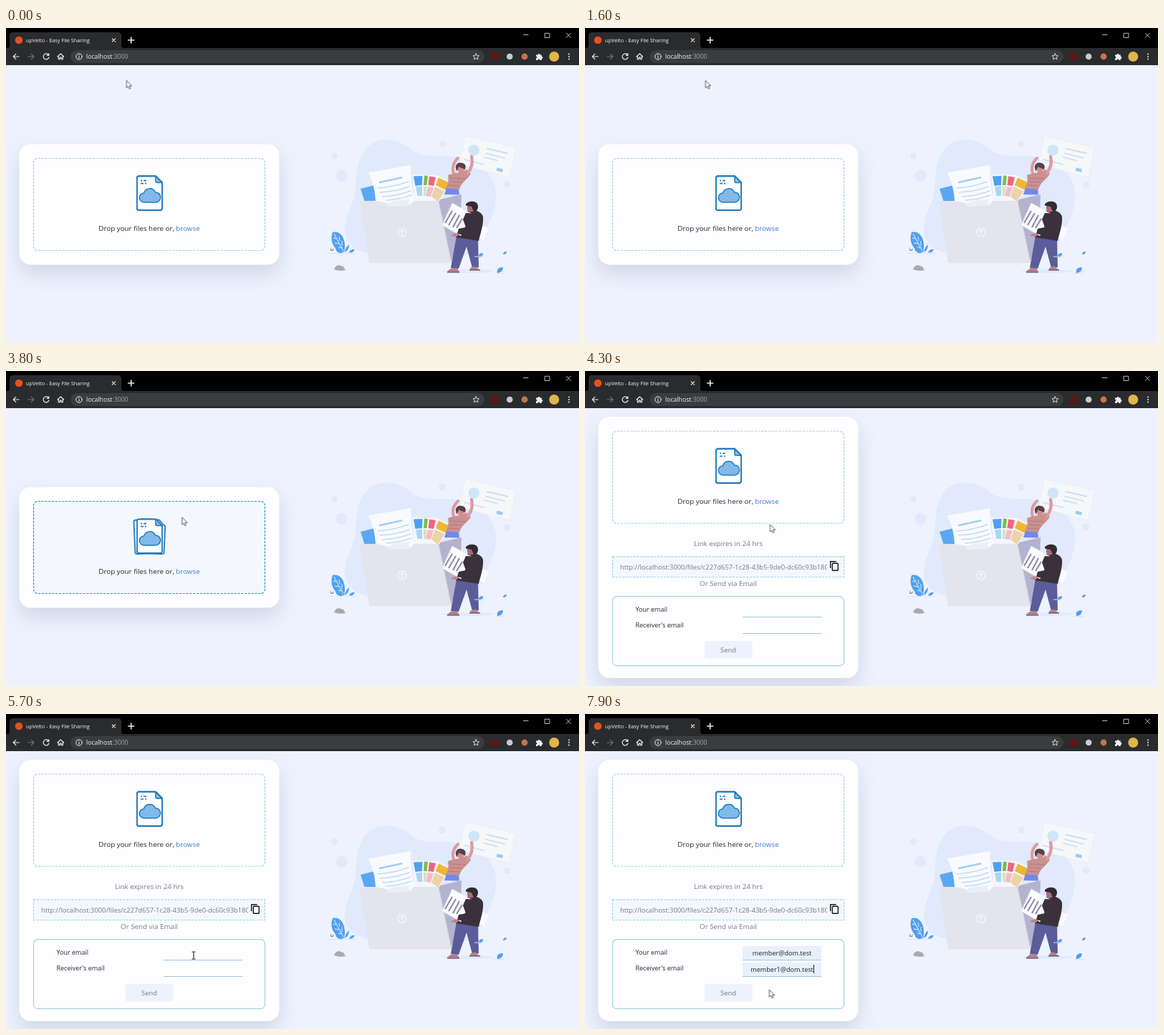
Recreate the animation shown at these times as an HTML page. Size 800x441 px, loop 8000 ms.

```html
<!DOCTYPE html>
<html lang="en">
<head>
<meta charset="utf-8">
<title>File sharing</title>
<style>
html, body { margin: 0; width: 100%; height: 100%; overflow: hidden; background: #edf2fe; }
body { position: relative; font-family: "Open Sans", "Noto Sans", sans-serif; }
svg { position: absolute; left: 0; top: 0; display: block; }
text { font-size: 9.8px; fill: #777a80; }
.mid { text-anchor: middle; }
.dark { fill: #25262b; }
.small { font-size: 9px; }
.ui { fill: none; stroke: #e9eaed; stroke-width: 1.2; stroke-linecap: round; stroke-linejoin: round; }
.white { fill: #fefdff; }
.shadow { filter: drop-shadow(0 13px 14px rgba(50, 60, 90, .15)); }
.line { fill: none; stroke: #a3d3df; stroke-width: 1.2; }
.dash { stroke-dasharray: 3.2 1.6; }
.page { fill: #fdfeff; stroke: #1e79bd; stroke-width: 1.8; stroke-linejoin: round; }

/* Everything shares one 8 s clock */
.idle, .open, #drop, #zone, #left, #right, #cursor, #arrow, #beam, .fill, .caret {
  animation: 8s step-end infinite;
}
.idle { animation-name: idle; }
.open { animation-name: open; }
#drop { animation-name: lift; }
#zone { fill: #f4f8fc; fill-opacity: 0; animation-name: hover; animation-timing-function: linear; }
.back { transform-box: fill-box; transform-origin: 50% 100%; }
#left { animation-name: fanLeft; animation-timing-function: ease-out; }
#right { animation-name: fanRight; animation-timing-function: ease-out; }
#cursor { animation-name: move; animation-timing-function: ease-in-out; }
#arrow { animation-name: arrow; }
#beam { animation-name: beam; }
#one .fill { animation-name: fillOne; }
#two .fill { animation-name: fillTwo; }
#one .caret { animation-name: caretOne; }
#two .caret { animation-name: caretTwo; }

@keyframes idle { 0% { opacity: 1 } 53.75%, 100% { opacity: 0 } }
@keyframes open { 0% { opacity: 0 } 53.75%, 100% { opacity: 1 } }
@keyframes lift { 0% { transform: none } 53.75%, 100% { transform: translateY(-98.3px) } }
@keyframes hover {
  0%, 44.5% { stroke: #a3d3df; fill-opacity: 0 }
  46%, 53.7% { stroke: #2795d3; fill-opacity: 1 }
  53.75%, 100% { stroke: #a3d3df; fill-opacity: 0 }
}
@keyframes fanLeft {
  0%, 44.5%, 53.75%, 100% { transform: none }
  47%, 53.7% { transform: translate(-2.5px, .5px) rotate(-2.6deg) }
}
@keyframes fanRight {
  0%, 44.5%, 53.75%, 100% { transform: none }
  47%, 53.7% { transform: translate(2.5px, .5px) rotate(2.6deg) }
}
@keyframes move {
  0%, 26.2% { transform: translate(168.3px, 73.5px) }
  26.25%, 37.5% { transform: translate(797px, 6px); animation-timing-function: ease-out }
  47.5%, 50% { transform: translate(245.8px, 204.8px) }
  54%, 59% { transform: translate(258.5px, 215px) }
  68%, 73% { transform: translate(262px, 338px) }
  80%, 83% { transform: translate(276px, 369px) }
  86%, 88% { transform: translate(270px, 360px) }
  93% { transform: translate(260px, 388px) }
  98%, 100% { transform: translate(257.3px, 386px) }
}
@keyframes arrow {
  0% { opacity: 1 } 26.25% { opacity: 0 } 37.5% { opacity: 1 }
  67.3% { opacity: 0 } 92%, 100% { opacity: 1 }
}
@keyframes beam { 0% { opacity: 0 } 67.3% { opacity: 1 } 92%, 100% { opacity: 0 } }
@keyframes fillOne { 0% { opacity: 0 } 80%, 100% { opacity: 1 } }
@keyframes fillTwo { 0% { opacity: 0 } 94%, 100% { opacity: 1 } }
@keyframes caretOne { 0% { opacity: 0 } 80% { opacity: 1 } 87%, 100% { opacity: 0 } }
@keyframes caretTwo { 0% { opacity: 0 } 94%, 100% { opacity: 1 } }

.field { position: absolute; left: 220px; width: 110px; height: 19px; border-bottom: 1px solid #9cc7e2; }
.fill { position: absolute; inset: 0; background: #e8f0fe; text-align: center; font-size: 9.1px; line-height: 20px; color: #202227; white-space: nowrap; }
.fill span { position: relative; }
.caret { position: absolute; right: -1.5px; top: 0; width: 1px; height: 12px; background: #222; }
</style>
</head>
<body>
<svg width="800" height="441" viewBox="0 0 800 441">
  <defs>
    <path id="sheet" d="M185.5 207.5H209L218 216.5V252.5a2.5 2.5 0 0 1-2.5 2.5h-30a2.5 2.5 0 0 1-2.5-2.5V210a2.5 2.5 0 0 1 2.5-2.5Z"/>
  </defs>
  <rect width="800" height="441" fill="#edf2fe"/>

  <!-- Browser bar -->
  <rect width="800" height="29" fill="#000"/>
  <path d="M0 28H2Q5 28 5 24V11Q5 6 10 6H156Q161 6 161 11V24Q161 28 164 28H800V52H0Z" fill="#2a2b2d"/>
  <rect x="90" y="31" width="578" height="18" rx="9" fill="#3b3c3f"/>
  <circle cx="18" cy="17" r="5.3" fill="#e4511f"/>
  <text x="28" y="19.6" style="font-size:7.3px;fill:#f4f5f6">upVelto - Easy File Sharing</text>
  <text x="112" y="43.3" style="font-size:8.7px;fill:#f1f2f3">localhost<tspan fill="#a5a9ae">:3000</tspan></text>
  <g class="ui">
    <path d="M148.3 14.8l4.4 4.4m0-4.4l-4.4 4.4"/>
    <path d="M174.7 13v8m-4-4h8" stroke-width="1.6"/>
    <path d="M722.5 9.5h6.5M752.5 7.3h6.4v6.2h-6.4zM782.3 7.2l6.2 6.2m0-6.2l-6.2 6.2" stroke-width=".8"/>
    <path d="M18.3 40h-8m3.5-3.6L10.2 40l3.6 3.6"/>
    <path d="M30.8 40h8m-3.5-3.6L38.9 40l-3.6 3.6" stroke="#717378"/>
    <path d="M59.4 37.6A4 4 0 1 0 60 41M59.8 35.8v2.6h-2.6"/>
    <path d="M72 40l4.3-4 4.3 4M73.3 39.5v4.2h2v-2.6h2v2.6h2v-4.2"/>
    <circle cx="102" cy="40" r="4.2" stroke-width="1"/>
    <path d="M102 39.8v2.2m0-4.1v.1"/>
    <path d="M656.3 35.8l1.3 2.8 3 .3-2.3 2 .7 3-2.7-1.6-2.7 1.6.7-3-2.3-2 3-.3z" stroke-width=".9"/>
  </g>
  <rect x="677.5" y="35" width="10" height="10" fill="#5f1613"/>
  <circle cx="703.2" cy="40" r="4.3" fill="#c9cacd"/>
  <circle cx="724" cy="40" r="4.4" fill="#c9734a"/>
  <path d="M740 37.5h2.5a1.6 1.6 0 1 1 3.2 0h2.1v2.3a1.6 1.6 0 1 1 0 3.2v2h-2.5a1.4 1.4 0 0 0-2.8 0h-2.5v-2.5a1.4 1.4 0 0 0 0-2.8z" fill="#eceef0"/>
  <circle cx="765.3" cy="40" r="7" fill="#e0b64a"/>
  <g fill="#eceef0"><circle cx="786" cy="36.4" r="1"/><circle cx="786" cy="40" r="1"/><circle cx="786" cy="43.6" r="1"/></g>

  <!-- Illustration: backdrop -->
  <g fill="#e0eafc">
    <path d="M500 172C514 151 545 152 566 170C584 184 601 176 626 180C656 184 681 202 684 228C687 258 668 282 660 306C650 330 560 322 510 316C480 312 470 294 474 273C477 255 486 246 488 225C490 205 488 190 500 172Z"/>
    <circle cx="458.5" cy="179" r="4.7"/><circle cx="468.5" cy="206.7" r="8.2"/>
    <circle cx="609" cy="162.5" r="4.8"/><circle cx="699.5" cy="219" r="4.8"/>
    <ellipse cx="645" cy="340.5" rx="36" ry="2.5"/>
  </g>
  <!-- Open folder and its papers -->
  <path d="M602 241L636 233L634 289L621 329Z" fill="#b4b2cf"/>
  <path d="M495 225L513 220.5L522 248L503 250Z" fill="#5ba7f3"/>
  <path d="M567 205L602 206L622 216L603 245L571 243Z" fill="#f5f6fb"/>
  <path d="M569 207.5L581.5 207L581 220L571.5 221Z" fill="#4f9ff1"/>
  <path d="M572 222.5L581 221.5L581 235L574.5 235Z" fill="#abd5f5"/>
  <path d="M584 206.5L589 207L587.5 220L583 220Z" fill="#7abd48"/>
  <path d="M583 222h4.5l-2 13h-2.5z" fill="#cde5bd"/>
  <path d="M591 207.5L600 209L597 221L589.5 220Z" fill="#f0657f"/>
  <path d="M589 222L597 223L593 236L586 235Z" fill="#f3bdca"/>
  <path d="M604 209.5L620 217L614 227L600 220Z" fill="#f0b637"/>
  <path d="M599 222L612.5 228.5L603 243L594 236Z" fill="#ecd3a8"/>
  <path d="M494 242H604L622 329H507Z" fill="#e3e4ed"/>
  <path d="M604 242L622 329" stroke="#cfcfdf" fill="none"/>
  <path d="M505.5 202.5L565.5 192C565 211 567 226 571 241C566 246 564 247 566 248L533 250C534 247 532 245 527 244L516 242C515 226 512 214 505.5 202.5Z" fill="#f9fafd"/>
  <path d="M533 250C530 244 538 245 541 242L570 239C560 239 560 245 566 248Z" fill="#eceef6"/>
  <g fill="none" stroke="#c2dcf5" stroke-width="1.6" stroke-linecap="round">
    <path d="M522 216L552 209.5" stroke="#a5cdf3" stroke-width="2.8"/>
    <path d="M519 224Q540 223 562 215M522 230Q545 229 563 222M526 236Q547 235 565 228M531 241Q550 240 566 234"/>
  </g>
  <g fill="none" stroke="#f8f9fc" stroke-width="1.2"><circle cx="553" cy="286" r="6"/><path d="M553 289.5v-7m-2.6 2.6l2.6-2.6 2.6 2.6"/></g>

  <!-- Person in the folder with a certificate -->
  <path d="M612 233L615 224L632 225L633 233.5Z" fill="#7189ea"/>
  <path d="M626 206C622 197 624 189 631 182" stroke="#dd9aa0" stroke-width="4" fill="none" stroke-linecap="round"/>
  <path d="M617 206C626 202 638 203 643 198L649 204C645 212 636 215 633 226L614 224C618 218 618 211 617 206Z" fill="#c9918f"/>
  <path d="M619 210l23 1M620 215l16 1M618 220l15 1" stroke="#a97078" stroke-width=".7"/>
  <path d="M641 151L712 167L703 209L633 191Z" fill="#f6f7f8" stroke="#e7ebf0" stroke-width=".8"/>
  <circle cx="653.3" cy="171" r="7.8" fill="#cfe5f8"/>
  <g stroke="#c8dff5" stroke-width="1.8" stroke-linecap="round">
    <path d="M672 169L700 175.5M670 175.5L696 182M668 181L686 185.5M640 184L667 191"/>
  </g>
  <path d="M685.5 195.5L694 197.5L693 202L684.5 200Z" fill="#9dcaf3"/>
  <path d="M645 203C651 195 652 188 650 180" stroke="#dd9aa0" stroke-width="4.4" fill="none" stroke-linecap="round"/>
  <ellipse cx="635" cy="198" rx="4.3" ry="5.3" fill="#d38c90"/>
  <path d="M628 196C627 191 632 187 637 189C642 190 643 195 640 199C639 195 635 197 633 194C631 195 631 200 629 200Z" fill="#584149"/>

  <!-- Person carrying a sheet -->
  <path d="M660 274L674 281L667 297L656 292Z" fill="#fafbfe"/>
  <path d="M629 291L659 295L660 335L651 336L643 306L632 337L621 336Z" fill="#5a5d99"/>
  <path d="M618 339q5-5 12-2l3 4h-17zM648 336q6-4 9-1l4 3.5h-13z" fill="#b97d88"/>
  <path d="M616 341.8h17M647 338.8h15" stroke="#4b4360" stroke-width="1.2"/>
  <path d="M642 257C650 253 663 255 666 264C667 276 662 288 660 298L628 293C634 282 636 264 642 257Z" fill="#3a313b"/>
  <path d="M623 245L650 260L635 291L609 276Z" fill="#fafbfe" stroke="#e2e5f0" stroke-width=".6"/>
  <path d="M623 256L613 273M628 259L618 276M633 262L624 279M637 267L629 280" stroke="#8d87a7" stroke-width="2"/>
  <path d="M642 259L664 260L661 285Q648 293 630 288L632 281L642 279L638 268Z" fill="#3a313b"/>
  <path d="M621 291q5-5 11-3l-2 4z" fill="#c47f88"/>
  <path d="M644 248h9l2 8-8 2-3-4z" fill="#a96c73"/>
  <path d="M642 246.5C645 242 656 241 658.5 247C660 252 658 257 653 257L650 250L642 248.5Z" fill="#302a33"/>

  <!-- Plants and stone -->
  <path d="M456 286C468 283 476 297 472 314C459 313 451 299 456 286Z" fill="#519fef"/>
  <path d="M458 288Q464 299 471 312M457 294l5 1m-3 6l7 1m-2 5l6 1m-5-16l1 6m3 0l0 7" stroke="#bcdcfa" stroke-width="1.3" fill="none"/>
  <g fill="#519fef">
    <path d="M460 309q5-1 10 6q-8 1-10-6zM479 303q-5 4-6 11q6-3 6-11zM487 310q-5-1-8 4q5 2 8-4z"/>
    <path d="M666 315q-7 0-6 6q6 0 6-6zM699 313q-5 0-5 4q5 0 5-4zM694 335q-10 0-8 8q8-1 8-8z"/>
  </g>
  <path d="M453 307l2 4 3-3-1 4h-4z" fill="#7fa39f"/>
  <path d="M458 338Q460 332 465 332L471 334L474 339Q465 341 458 338Z" fill="#a9a9b0"/>
  <path d="M450 315.5h40M654 320h13M682 343.5h15" stroke="#dae3f4" stroke-width="1"/>

  <!-- Upload card -->
  <rect class="white shadow idle" x="18.5" y="162.5" width="363" height="169" rx="16"/>
  <rect class="white shadow open" x="18.5" y="64" width="363" height="366" rx="16"/>
  <g id="drop">
    <rect id="zone" class="line dash" x="38.5" y="182.5" width="323" height="129" rx="6"/>
    <g class="page">
      <use id="left" class="back" href="#sheet"/>
      <use id="right" class="back" href="#sheet"/>
      <use href="#sheet"/>
      <path d="M209 207.5V214.5Q209 216.5 211 216.5H218Z" fill="#84bbe8" stroke-width="1.5"/>
      <path d="M193 244a6.5 6.5 0 0 1-.5-13a8.5 8.5 0 0 1 16-1a7 7 0 0 1 .5 14z" fill="#80b9ea" stroke-width="1.4"/>
      <path d="M188 213.6h2m2 0h4M188 217.6h4m2 0h2" stroke-width="1.6"/>
    </g>
    <text class="mid dark" x="200" y="284">Drop your files here or, <tspan fill="#3b82d0">browse</tspan></text>
  </g>

  <!-- Sharing panel -->
  <g class="open">
    <text class="mid" x="200" y="245">Link expires in 24 hrs</text>
    <rect class="line dash" x="38.5" y="259.8" width="323" height="28.7" style="fill:#f4f8fd"/>
    <clipPath id="clip"><rect x="45" y="262" width="293" height="24"/></clipPath>
    <text x="49" y="277.5" style="font-size:9.35px" clip-path="url(#clip)">http://localhost:3000/files/c227d657-1c28-43b5-9de0-dc60c93b180</text>
    <path d="M342.7 276v-9.3h8" fill="none" stroke="#17181b" stroke-width="1.4"/>
    <rect x="345.3" y="269.3" width="8" height="10" rx=".8" fill="none" stroke="#17181b" stroke-width="1.4"/>
    <text class="mid" x="200" y="301">Or Send via Email</text>
    <rect class="line" x="38.5" y="315.7" width="323" height="97" rx="6"/>
    <text class="dark small" x="70.5" y="336.5">Your email</text>
    <text class="dark small" x="70.5" y="359.3">Receiver's email</text>
    <rect x="167" y="378" width="66.5" height="24.5" rx="2.5" fill="#edf2fe"/>
    <text class="mid" x="200" y="394" style="font-size:9.4px">Send</text>
  </g>
</svg>

<div class="open">
  <div class="field" id="one" style="top:325px"><div class="fill"><span>member@dom.test<i class="caret"></i></span></div></div>
  <div class="field" id="two" style="top:348px"><div class="fill"><span>member1@dom.test<i class="caret"></i></span></div></div>
</div>

<svg width="800" height="441" viewBox="0 0 800 441">
  <g id="cursor">
    <path id="arrow" d="M0 0V10.3L2.3 8.2L3.9 11.7L5.6 11L4.1 7.5H7.3Z" fill="#fff" stroke="#33343a" stroke-width=".8" stroke-linejoin="round"/>
    <path id="beam" d="M-2.5 -5h1.7q.8 0 .8.8v8.4q0 .8-.8.8h-1.7M2.5 -5h-1.7q-.8 0-.8.8m0 8.4q0 .8.8.8h1.7" fill="none" stroke="#222" stroke-width="1.1"/>
  </g>
</svg>
</body>
</html>
```
